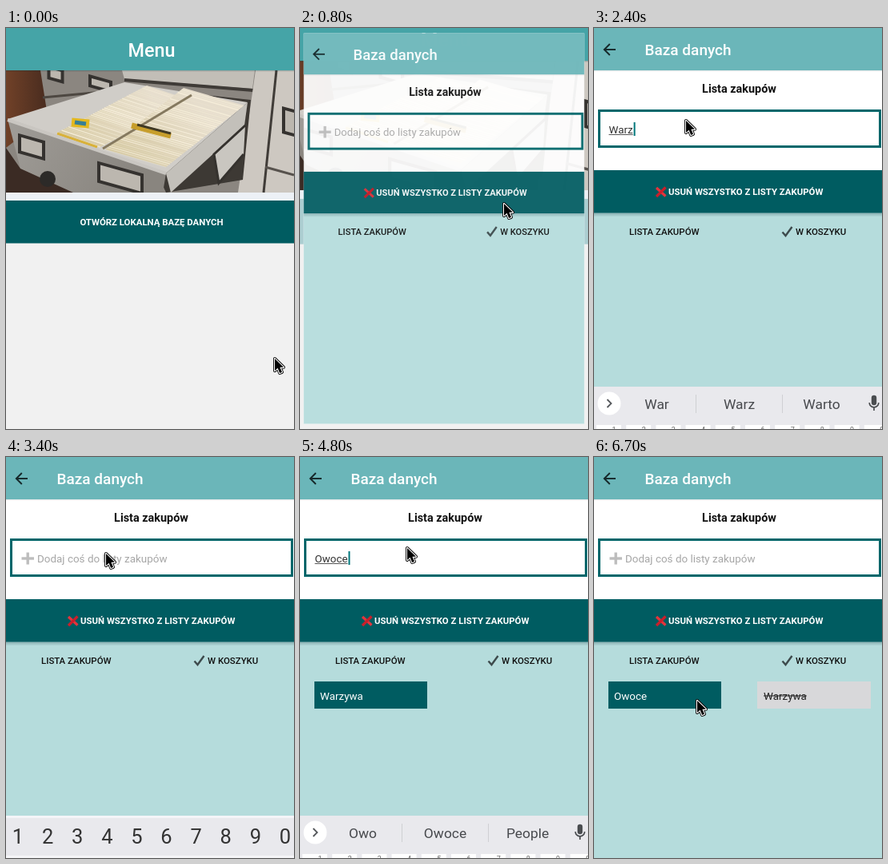
An HTML page with a canvas that plays this animation: 360x502 px, repeating every 7200 ms.

```html
<!DOCTYPE html>
<html lang="pl">
<head>
<meta charset="utf-8">
<title>Lista zakupów</title>
<style>
html, body { margin: 0; width: 100%; height: 100%; overflow: hidden; background: #fff; }
canvas { display: block; }
</style>
</head>
<body>
<canvas id="stage" width="360" height="502"></canvas>
<script>
const ctx = document.getElementById('stage').getContext('2d');
const W = 360, H = 502, LOOP = 7200, STEP = 100;
const TEAL = '#005c61', PALE = '#b5dcdc', KEYS = '#e9e9ed';

const clamp = v => Math.max(0, Math.min(1, v));
const ease = v => v * v * (3 - 2 * v);
const lerp = (a, b, k) => a + (b - a) * k;
const span = (t, a, b) => clamp((t - a) / (b - a));
const noise = n => Math.abs(Math.sin(n * 127.1) * 43758.5) % 1;

function rect(x, y, w, h, fill) {
  ctx.fillStyle = fill;
  ctx.fillRect(x, y, w, h);
}

function trace(p) {
  ctx.beginPath();
  for (let i = 0; i < p.length; i += 2) ctx.lineTo(p[i], p[i + 1]);
}

function poly(fill, ...p) {
  ctx.fillStyle = fill;
  trace(p);
  ctx.fill();
}

function line(color, width, ...p) {
  ctx.strokeStyle = color;
  ctx.lineWidth = width;
  trace(p);
  ctx.stroke();
}

function disc(x, y, r, fill) {
  ctx.fillStyle = fill;
  ctx.beginPath();
  ctx.arc(x, y, r, 0, 2 * Math.PI);
  ctx.fill();
}

function text(s, x, y, size, color, weight = 400, align = 'left') {
  ctx.font = `${weight} ${size}px Roboto, sans-serif`;
  ctx.textAlign = align;
  ctx.fillStyle = color;
  ctx.fillText(s, x, y);
  return ctx.measureText(s).width;
}

function fade(x0, y0, x1, y1, from, to) {
  const g = ctx.createLinearGradient(x0, y0, x1, y1);
  g.addColorStop(0, from);
  g.addColorStop(1, to);
  return g;
}

function shadow(y, h, alpha) {
  rect(0, y, W, h, fade(0, y, 0, y + h, `rgba(0,40,50,${alpha})`, 'rgba(0,40,50,0)'));
}

// Slanted metal label frame around its centre
function holder(x, y, w, h) {
  for (const [d, c] of [[0, '#35322f'], [4, '#bcb7af']]) {
    const a = w / 2 - d, b = h / 2 - d, s = a * 0.28;
    poly(c, x - a, y - b - s, x + a, y - b + s, x + a, y + b + s, x - a, y + b - s);
  }
}

// A block of index cards: near left corner, near right corner, depth
function cards(ax, ay, bx, by, dx, dy) {
  const n = 40;
  poly(fade(ax, ay, ax + dx, ay + dy, '#d2c59c', '#e6ddcc'),
    ax, ay, bx, by, bx + dx, by + dy, ax + dx, ay + dy);
  for (let i = 0; i < n; i++) {
    const x = dx * i / n, y = dy * i / n;
    line(`rgba(246,238,218,${noise(i + ax)})`, 1.5, ax + x, ay + y, bx + x, by + y);
  }
}

function photo() {
  ctx.save();
  ctx.beginPath();
  ctx.rect(0, 53, W, 153);
  ctx.clip();
  // cabinet behind
  rect(0, 53, W, 153, '#8b8680');
  poly(fade(0, 0, 50, 0, '#704128', '#4a2c1f'), 0, 53, 43, 53, 52, 110, 0, 150);
  line('#4d4741', 3, 46, 87, 142, 78);
  holder(62, 58, 21, 18);
  holder(118, 70, 30, 16);
  poly('#c2beb7', 145, 53, 311, 53, 308, 76, 148, 64);
  line('#3f3b37', 4, 148, 65, 309, 78);
  poly('#cdc8c1', 312, 53, 360, 53, 360, 206, 290, 206);
  line('#403c38', 3, 338, 53, 322, 206);
  line('#57524d', 3, 324, 174, 360, 184);
  holder(356, 118, 22, 34);
  // open drawer
  poly('#3d3934', 140, 72, 306, 90, 296, 190, 200, 206);
  poly('#d0cdc8', 2, 114, 148, 68, 302, 93, 200, 182);
  cards(64, 131, 118, 149, 112, -59);
  cards(124, 152, 200, 174, 98, -77);
  line('#85795f', 3, 121, 151, 232, 84);
  line('#d8b13a', 3, 64, 132, 114, 149);
  line('#e3b820', 11, 82, 118, 104, 120);
  line('#377f94', 5, 86, 118, 100, 120);
  line('#c79e2c', 7, 157, 122, 206, 135);
  line('#413a24', 3, 164, 121, 206, 132);
  poly('#c3c0ba', 200, 182, 302, 93, 298, 122, 206, 206);
  poly('#c9c6c0', 260, 158, 299, 122, 297, 158, 266, 194);
  line('#35322e', 3, 299, 122, 260, 158, 266, 194, 297, 158);
  poly(fade(0, 115, 150, 206, '#a09d98', '#89857f'), 2, 114, 200, 182, 196, 206, 84, 206, 18, 176);
  line('#c9c6c1', 4, 2, 115, 200, 182);
  poly('#3b2b24', 0, 150, 18, 176, 84, 206, 0, 206);
  holder(32, 149, 34, 25);
  holder(143, 188, 58, 27);
  disc(52, 189, 10, '#2c2a28');
  ctx.restore();
}

function menu(pressed) {
  rect(0, 0, W, H, '#f1f1f1');
  photo();
  rect(0, 0, W, 53, '#45a4a7');
  shadow(53, 2, 0.25);
  text('Menu', 182, 35.5, 23.4, '#fff', 500, 'center');
  rect(0, 206, W, 10, '#edf1f6');
  const mix = (a, b) => Math.round(lerp(a, b, pressed));
  rect(0, 216, W, 53.5, `rgb(${mix(0, 172)},${mix(92, 206)},${mix(97, 209)})`);
  text('OTWÓRZ LOKALNĄ BAZĘ DANYCH', 182, 247, 11.4,
    `rgba(255,255,255,${1 - 0.75 * pressed})`, 700, 'center');
}

function backArrow() {
  line('#16282a', 1.9, 27, 27, 13.5, 27);
  line('#16282a', 1.9, 19.8, 20, 12.8, 27, 19.8, 34);
}

function cross() {
  line('#e4343c', 3.2, 78, 200, 89.5, 210.5);
  line('#c91f2b', 3.2, 89.5, 199.5, 78, 211);
}

function field(s) {
  ctx.strokeStyle = '#00666a';
  ctx.lineWidth = 3;
  ctx.strokeRect(6.5, 103.5, 351, 45);
  let x = 19.5;
  if (s.typed) {
    const w = text(s.typed, 18.5, 131.5, 13.4, '#333');
    rect(18.5, 133, w, 1, '#555');
    x += w + 1;
  } else {
    line('#bdbdbd', 3.4, 19.5, 127, 35, 127);
    line('#bdbdbd', 3.4, 27.2, 119.5, 27.2, 134.5);
    text('Dodaj coś do listy zakupów', 39, 131.5, 13.45, '#a6a6a6');
  }
  if (s.caret) rect(x - 1, 118, 2, 17, '#00777b');
}

function item(label, row, alpha) {
  ctx.save();
  ctx.globalAlpha *= alpha;
  const y = 281 + row * 36;
  rect(18, y, 141, 34, TEAL);
  text(label, 25, y + 22.5, 13.4, '#fff');
  ctx.restore();
}

function bought(label) {
  rect(204, 281, 142, 34, '#d8d8da');
  const w = text(label, 212, 303.5, 13.4, '#222');
  rect(212, 298.5, w, 1, '#222');
}

function mic() {
  const ink = '#4a4d50';
  ctx.lineCap = 'round';
  line(ink, 6.4, 350, 463, 350, 469);
  ctx.lineCap = 'butt';
  ctx.lineWidth = 1.7;
  ctx.beginPath();
  ctx.arc(350, 469, 5.8, 0, Math.PI);
  ctx.stroke();
  line(ink, 1.7, 350, 475, 350, 479);
}

function suggestions(typed) {
  disc(19, 470, 14.5, '#fff');
  line('#55585c', 1.8, 16.5, 465, 21.5, 470, 16.5, 475);
  rect(127, 459, 1, 23, '#cfd0d3');
  rect(235, 459, 1, 23, '#cfd0d3');
  mic();
  if (typed) {
    const words = [typed.slice(0, 3), typed, typed[0] === 'W' ? 'Warto' : 'People'];
    words.forEach((w, i) => text(w, 78.5 + i * 103, 476.5, 17.4, '#47494d', 400, 'center'));
  }
  for (let i = 0; i < 10; i++) {
    rect(3 + i * 37.2, 497, 31, 5, '#fff');
    text((i + 1) % 10, 25 + i * 37.2, 506, 9, '#666', 400, 'center');
  }
}

function keyboard(s) {
  rect(0, 449, W, 53, s.kb === 'gap' ? '#fff' : KEYS);
  if (s.kb === 'words') suggestions(s.typed);
  if (s.kb !== 'digits') return;
  rect(0, 449, W, 3, '#f4f5f8');
  rect(0, 499, W, 3, '#f6f6f8');
  for (let i = 0; i < 10; i++)
    text((i + 1) % 10, 15 + i * 37.1, 484, 25.5, '#333', 400, 'center');
}

function shop(s) {
  rect(0, 0, W, H, '#fff');
  rect(0, 0, W, 53, '#6bb6b9');
  shadow(53, 2, 0.12);
  backArrow();
  text('Baza danych', 63.5, 34, 19, '#fff', 500);
  text('Lista zakupów', 181.5, 80.5, 14.4, '#111', 700, 'center');
  field(s);
  rect(0, 231, W, 271, PALE);
  rect(0, 178, W, 53.5, TEAL);
  shadow(231.5, 5, 0.25);
  cross();
  text('USUŃ WSZYSTKO Z LISTY ZAKUPÓW', 93, 209, 11.4, '#fff', 700);
  text('LISTA ZAKUPÓW', 44, 259, 11.45, '#111', 500);
  line('#3d4a4c', 2.4, 235.5, 255.5, 239.5, 260, 247.5, 249);
  text('W KOSZYKU', 252, 259, 11.45, '#111', 500);
  s.items.forEach((name, i) => item(name, i, i ? 1 : s.fade));
  if (s.bought) bought(s.bought);
  if (s.kb) keyboard(s);
}

function cursor(x, y) {
  ctx.save();
  ctx.translate(x, y);
  const p = new Path2D('M1 1V16L4.6 12.8L7.2 19L10 17.8L7.4 11.8H12Z');
  ctx.lineJoin = 'round';
  for (const [w, c] of [[4, '#000'], [2.2, '#fff']]) {
    ctx.lineWidth = w;
    ctx.strokeStyle = c;
    ctx.stroke(p);
  }
  ctx.fillStyle = '#000';
  ctx.fill(p);
  ctx.restore();
}

// Pointer stops: start, end, x, y
const moves = [
  [0, 500, 254, 219], [900, 1300, 114, 115], [2900, 3400, 124, 120],
  [4100, 4700, 133, 113], [5600, 5900, 141, 277], [5900, 6200, 128, 304]
];

function pointer(t) {
  let x = 335, y = 413;
  for (const [a, b, tx, ty] of moves) {
    const k = ease(span(t, a, b));
    x = lerp(x, tx, k);
    y = lerp(y, ty, k);
  }
  return [x, y];
}

const within = (t, a, b) => t >= a && t < b;

function typedAt(t) {
  if (within(t, 2000, 3200)) return 'Warzywa'.slice(0, Math.ceil((t - 1900) / 150));
  if (within(t, 4100, 5000)) return 'Owoce'.slice(0, Math.ceil((t - 4000) / 160));
  return '';
}

function keysAt(t) {
  if (!within(t, 1400, 5200)) return '';
  if (!within(t, 1500, 5100)) return 'gap';
  return within(t, 3300, 4100) ? 'digits' : 'words';
}

function stateAt(t) {
  const moved = t >= 6300;
  const items = [];
  if (within(t, 3600, 6300)) items.push('Warzywa');
  if (t >= 5600) items.push('Owoce');
  return {
    typed: typedAt(t),
    kb: keysAt(t),
    caret: within(t, 1300, 1800) || within(t, 2000, 3300) || within(t, 4100, 5100),
    items,
    fade: within(t, 6100, 6300) ? 0.35 : 1,
    bought: moved ? 'Warzywa' : ''
  };
}

function zoomed(scale, alpha, draw) {
  ctx.save();
  ctx.globalAlpha = alpha;
  ctx.translate(W / 2, H / 2);
  ctx.scale(scale, scale);
  ctx.translate(-W / 2, -H / 2);
  draw();
  ctx.restore();
}

function render(t) {
  ctx.clearRect(0, 0, W, H);
  if (t < 900) {
    const grow = t < 600 ? 1 : lerp(1.015, 1.06, span(t, 600, 800));
    zoomed(grow, 1, () => menu(span(t, 400, 600)));
  }
  if (t >= 700) {
    const k = span(t, 600, 900);
    zoomed(lerp(0.9, 1, ease(k)), clamp(k * 1.4), () => shop(stateAt(t)));
  }
  cursor(...pointer(t));
}

function tick() {
  const t = performance.now() % LOOP;
  render(Math.floor(t / STEP) * STEP);
  requestAnimationFrame(tick);
}
tick();
</script>
</body>
</html>
```
